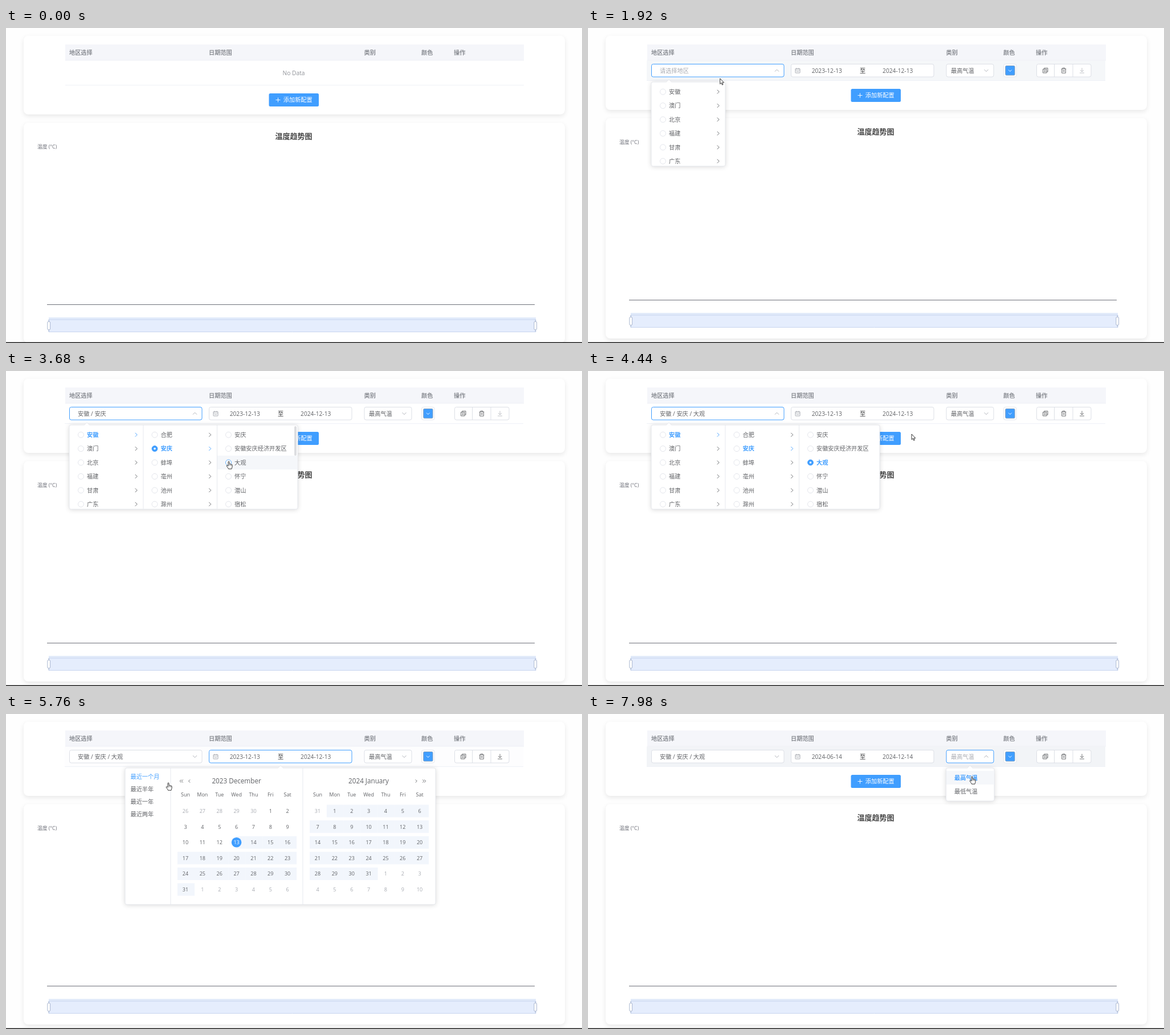
These frames come from a looping animation (1011 px wide and 554 px high, 8000 ms). An HTML page with a canvas:

```html
<!DOCTYPE html>
<html lang="zh">
<head>
<meta charset="utf-8">
<title>温度趋势图</title>
<style>
html, body { margin: 0; width: 100%; height: 100%; overflow: hidden; background: #fefefe; }
canvas { display: block; width: 1011px; height: 554px; }
</style>
</head>
<body>
<canvas id="stage"></canvas>
<script>
const W = 1011, H = 554, LOOP = 8000;
const canvas = document.getElementById('stage');
const ctx = canvas.getContext('2d');
const dpr = window.devicePixelRatio || 1;
canvas.width = W * dpr;
canvas.height = H * dpr;

const FONT = '"Open Sans", "Noto Sans CJK SC", "Noto Sans CJK", sans-serif';
const BLUE = '#409eff', INK = '#606266', MUTED = '#a8abb2', BORDER = '#dcdfe6', LINE = '#ebeef5';

// Moments at which the interface changes, in ms
const AT = { add: 760, region: 1620, province: 2500, city: 3040, county: 3880, regionEnd: 4660,
  dates: 5100, datesEnd: 6490, type: 7500 };

const PATH = [
  [160, 612, 29], [560, 512, 133], [800, 512, 133], [1240, 253, 83], [1700, 253, 83],
  [2400, 163, 108], [2520, 163, 108], [2920, 262, 134], [3320, 262, 134], [3680, 391, 159],
  [3900, 391, 159], [4420, 568, 111], [4650, 568, 111], [5080, 418, 82], [5520, 418, 82],
  [5840, 261, 128], [6720, 261, 128], [7300, 670, 78], [7540, 670, 78], [7920, 674, 110]
];
const HOVERS = [[1100, 1850], [4950, 5560], [7160, 9000]];
const COLUMNS = [
  { x: 111, items: ['安徽', '澳门', '北京', '福建', '甘肃', '广东'] },
  { x: 240.5, items: ['合肥', '安庆', '蚌埠', '亳州', '池州', '滁州'] },
  { x: 370, items: ['安庆', '安徽安庆经济开发区', '大观', '怀宁', '潜山', '宿松'] }
];
const EDGES = [241, 371, 512];

const clamp = v => Math.max(0, Math.min(1, v));
const smooth = v => v * v * (3 - 2 * v);
const easeOut = v => 1 - Math.pow(1 - clamp(v), 5);
const between = (t, a, b) => t >= a && t < b;
const inside = (p, x0, y0, x1, y1) => p && p.x >= x0 && p.x <= x1 && p.y >= y0 && p.y <= y1;
const popped = (t, open, close = 1e9) => t < close ? easeOut((t - open) / 300) : 1 - easeOut((t - close) / 300);

function pointer(t) {
  if (t < PATH[0][0]) return null;
  let i = 0;
  while (i < PATH.length - 1 && PATH[i + 1][0] <= t) i++;
  const a = PATH[i], b = PATH[i + 1] || a;
  const k = a === b ? 0 : smooth((t - a[0]) / (b[0] - a[0]));
  return { x: a[1] + (b[1] - a[1]) * k, y: a[2] + (b[2] - a[2]) * k };
}

function rowTint(t) {
  return Math.max(...HOVERS.map(([a, b]) => Math.min(clamp((t - a) / 250), 1 - clamp((t - b) / 250))));
}

function text(s, x, y, { size = 10.2, color = INK, bold = false, align = 'left' } = {}) {
  ctx.font = `${bold ? 'bold ' : ''}${size}px ${FONT}`;
  ctx.fillStyle = color;
  ctx.textAlign = align;
  ctx.fillText(s, x, y + size * 0.37);
}

function rect(x0, y0, x1, y1, fill) {
  ctx.fillStyle = fill;
  ctx.fillRect(x0, y0, x1 - x0, y1 - y0);
}

function box(x0, y0, x1, y1, r, fill, stroke) {
  ctx.beginPath();
  ctx.roundRect(x0, y0, x1 - x0, y1 - y0, r);
  if (fill) { ctx.fillStyle = fill; ctx.fill(); }
  if (stroke) { ctx.strokeStyle = stroke; ctx.lineWidth = 1; ctx.stroke(); }
}

function lines(color, width, ...paths) {
  ctx.strokeStyle = color;
  ctx.lineWidth = width;
  ctx.beginPath();
  for (const p of paths) {
    ctx.moveTo(p[0], p[1]);
    for (let i = 2; i < p.length; i += 2) ctx.lineTo(p[i], p[i + 1]);
  }
  ctx.stroke();
}

function circle(x, y, r, fill, stroke) {
  ctx.beginPath();
  ctx.arc(x, y, r, 0, Math.PI * 2);
  if (fill) { ctx.fillStyle = fill; ctx.fill(); }
  if (stroke) { ctx.strokeStyle = stroke; ctx.lineWidth = 0.8; ctx.stroke(); }
}

function shadowed(color, blur, dy, draw) {
  ctx.save();
  ctx.shadowColor = color;
  ctx.shadowBlur = blur * dpr;
  ctx.shadowOffsetY = dy * dpr;
  draw();
  ctx.restore();
}

const card = (y0, y1) =>
  shadowed('rgba(0,0,0,.09)', 8, 3, () => box(31, y0, 981, y1, 8, '#fff'));

// Vertical chevron; dir 1 points down, -1 up
const chevron = (x, y, dir, color = MUTED, w = 3.5) =>
  lines(color, 0.9, [x - w, y - dir * w / 2, x, y + dir * w / 2, x + w, y - dir * w / 2]);

// Horizontal angle; dir 1 points right, -1 left
const angle = (x, y, dir, color = INK, h = 3.4) =>
  lines(color, 0.9, [x - dir * h / 2, y - h, x + dir * h / 2, y, x - dir * h / 2, y + h]);

const caret = (x, y) => rect(x, y - 6.5, x + 0.9, y + 6.5, '#303133');

function popup(k, x0, x1, height, arrowX, draw) {
  if (k <= 0.004) return;
  ctx.save();
  ctx.globalAlpha = k;
  ctx.translate(0, 95);
  ctx.scale(1, k);
  shadowed('rgba(0,0,0,.16)', 8, 1, () => box(x0, 0, x1, height, 3, '#fff'));
  box(x0, 0, x1, height, 3, '#fff', '#e6e8ed');
  ctx.beginPath();
  ctx.moveTo(arrowX - 5, 0.8);
  ctx.lineTo(arrowX, -4);
  ctx.lineTo(arrowX + 5, 0.8);
  ctx.fillStyle = '#fff';
  ctx.fill();
  lines('#e6e8ed', 0.8, [arrowX - 5, 0, arrowX, -4, arrowX + 5, 0]);
  draw();
  ctx.restore();
}

function addButton(y, p) {
  const hot = inside(p, 461, y - 11.5, 549, y + 11.5);
  box(461.5, y - 11.5, 549, y + 11.5, 2.5, hot ? '#79bbff' : BLUE);
  lines('#fff', 0.9, [473.5, y, 481.5, y], [477.5, y - 4, 477.5, y + 4]);
  text('添加新配置', 486.8, y, { color: '#fff' });
}

function header() {
  rect(104, 29, 909, 57, '#f5f6fa');
  rect(104, 56.5, 909, 57.3, LINE);
  [['地区选择', 111], ['日期范围', 356], ['类别', 628.5], ['颜色', 729], ['操作', 786]]
    .forEach(([s, x]) => text(s, x, 43, { bold: true, color: '#8b8e94' }));
}

function calendarIcon(x, y) {
  box(x - 4, y - 3.5, x + 4, y + 4, 0.5, null, MUTED);
  lines(MUTED, 0.8, [x - 4, y - 1, x + 4, y - 1], [x - 2, y - 5, x - 2, y - 2.5], [x + 2, y - 5, x + 2, y - 2.5],
    [x - 2.3, y + 1.5, x + 2.3, y + 1.5]);
}

function actions(ready) {
  box(787.5, 63.5, 883, 86, 3, '#fff', BORDER);
  lines(BORDER, 1, [818.5, 64, 818.5, 86], [851, 64, 851, 86]);
  ctx.lineCap = 'butt';
  lines(INK, 0.9, [800.5, 72.5, 800.5, 70.5, 807, 70.5, 807, 77, 805, 77], [798.5, 72.5, 805, 72.5, 805, 79, 798.5, 79, 798.5, 72.5],
    [800, 74.8, 803.5, 74.8], [800, 76.8, 803.5, 76.8]);
  lines(INK, 0.9, [830.7, 72, 839.3, 72], [833, 72, 833, 70.3, 837, 70.3, 837, 72],
    [831.7, 72, 831.7, 79.2, 838.3, 79.2, 838.3, 72], [834, 74, 834, 77], [836, 74, 836, 77]);
  lines(ready ? INK : '#b8bbc1', 0.9, [867, 70.3, 867, 76.8], [864, 74, 867, 77, 870, 74], [863, 79, 871, 79]);
}

function row(t, p) {
  rect(103, 57.3, 908, 92, `rgba(242,244,247,${rowTint(t)})`);
  rect(103, 92, 908, 92.8, LINE);

  const picking = between(t, AT.region, AT.regionEnd);
  box(111.5, 63.5, 344, 86, 3, '#fff', picking ? BLUE : BORDER);
  const region = t < AT.city ? '请选择地区' : t < AT.county ? '安徽 / 安庆' : '安徽 / 安庆 / 大观';
  text(region, 126, 75, { color: t < AT.city ? MUTED : INK });
  chevron(331.5, 74.8, picking ? -1 : 1);

  const dating = between(t, AT.dates, 7440);
  const recent = t >= AT.datesEnd;
  box(356.5, 63.5, 607, 86, 3, '#fff', dating ? BLUE : BORDER);
  calendarIcon(368, 75);
  text(recent ? '2024-06-14' : '2023-12-13', 419.3, 75, { align: 'center' });
  text('至', 482, 75, { align: 'center', color: '#303133' });
  text(recent ? '2024-12-14' : '2024-12-13', 543.7, 75, { align: 'center' });
  if (between(t, AT.dates, 5710) || between(t, 6210, AT.datesEnd)) caret(419, 75);
  if (between(t, AT.datesEnd, 7000)) caret(445.5, 75);
  if (inside(p, 356, 63, 607, 86)) {
    circle(595.5, 74.8, 4.2, null, MUTED);
    lines(MUTED, 0.8, [594, 73.3, 597, 76.3], [597, 73.3, 594, 76.3]);
  }

  const typing = t >= AT.type;
  box(629, 63.5, 712, 86, 3, '#fff', typing ? BLUE : BORDER);
  text('最高气温', 637, 75, { color: typing ? MUTED : INK });
  chevron(699, 74.8, typing ? -1 : 1);

  box(729.5, 63.5, 752, 86, 3, '#fff', '#e4e7ed');
  box(732.8, 66.5, 749, 83, 1.5, BLUE, '#7f9fc0');
  chevron(740.8, 75, 1, '#fff', 2.8);
  actions(t >= AT.county);
}

function chart(dy) {
  text('温度趋势图', 505, 182 + dy, { size: 13, bold: true, color: '#464646', align: 'center' });
  text('温度 (°C)', 55, 200.3 + dy, { size: 8.75, color: '#6e7079' });
  rect(72, 478 + dy, 928, 479 + dy, '#6e7079');
  rect(75, 501 + dy, 930, 505 + dy, '#e1eafa');
  rect(75, 505 + dy, 930, 526.5 + dy, '#e5edfd');
  lines('#c3d2ee', 0.9, [75, 505 + dy, 930, 505 + dy, 930, 526.5 + dy, 75, 526.5 + dy, 75, 505 + dy]);
  for (const x of [75.2, 929.2]) {
    lines('#acb8d1', 1, [x, 505 + dy, x, 526 + dy]);
    box(x - 2.4, 508.5 + dy, x + 2.4, 522.5 + dy, 1.5, '#fff', '#acb8d1');
  }
}

function regionPopup(t, p) {
  const count = t < AT.province ? 1 : t < AT.city ? 2 : 3;
  const picked = t < AT.city ? null : t < AT.county ? [1, 1] : [2, 2];
  popup(popped(t, AT.region, AT.regionEnd), 111, EDGES[count - 1], 148, 142, () => {
    ctx.beginPath();
    ctx.rect(111, 0, EDGES[count - 1] - 111, 147.5);
    ctx.clip();
    COLUMNS.slice(0, count).forEach((col, c) => {
      const over = t > AT.region && inside(p, col.x, 98, EDGES[c], 243);
      if (c) rect(col.x, 0, col.x + 0.9, 148, '#e4e7ed');
      col.items.forEach((name, i) => {
        const y = 17.2 + i * 24.4;
        const hot = over && Math.abs(p.y - 95 - y) < 12.2;
        if (hot) rect(col.x + 1, y - 12.2, EDGES[c] - 1, y + 12.2, '#f5f7fa');
        const checked = picked && picked[0] === c && picked[1] === i;
        const active = checked || (c === 0 && i === 0 && count > 1) || (c === 1 && i === 1 && count > 2);
        const color = active && picked ? BLUE : INK;
        const rx = col.x + 20.5;
        circle(rx, y, 5, checked ? BLUE : '#fff', checked || (hot && Math.abs(p.x - rx) < 6) ? BLUE : BORDER);
        if (checked) circle(rx, y, 1.8, '#fff');
        text(name, col.x + 31, y, { color, bold: active });
        if (c < 2) angle(col.x + 117.5, y, 1, color);
      });
      if (over) box(EDGES[c] - 6, 2, EDGES[c] - 2, 54, 2, '#dddee1');
    });
    if (between(t, AT.province, AT.city + 240)) caret(162.7, 17.2);
  });
}

const DAYS = ['Sun', 'Mon', 'Tue', 'Wed', 'Thu', 'Fri', 'Sat'];
const STEP = 29.85;

// lead: cells before the 1st; from: first selected day
function month(x, title, lead, prevLength, from) {
  text(title, x + 3 * STEP, 23, { size: 11.7, align: 'center' });
  DAYS.forEach((d, i) => text(d, x + i * STEP, 47, { size: 9, align: 'center' }));
  for (let i = 0; i < 42; i++) {
    const cx = x + (i % 7) * STEP, cy = 75.6 + Math.floor(i / 7) * 27.6;
    const day = i - lead + 1;
    const current = day >= 1 && day <= 31;
    if (current && day >= from) {
      const start = from > 1 && day === from;
      rect(start ? cx : cx - 14, cy - 11, cx + 16, cy + 11, '#f2f6fc');
    }
  }
  for (let i = 0; i < 42; i++) {
    const cx = x + (i % 7) * STEP, cy = 75.6 + Math.floor(i / 7) * 27.6;
    const day = i - lead + 1;
    const current = day >= 1 && day <= 31;
    const start = from > 1 && day === from;
    if (start) circle(cx, cy, 8.8, BLUE);
    const label = day < 1 ? prevLength + day : day > 31 ? day - 31 : day;
    text(String(label), cx, cy, { size: 9, align: 'center', color: start ? '#fff' : current ? INK : MUTED });
  }
}

function datePopup(t, p) {
  popup(popped(t, AT.dates, AT.datesEnd), 209, 754, 240, 482, () => {
    rect(288.5, 0, 289.4, 240, '#e4e7ed');
    rect(520.5, 0, 521.4, 240, '#e4e7ed');
    ['最近一个月', '最近半年', '最近一年', '最近两年'].forEach((s, i) => {
      const y = 15.5 + i * 21.9;
      const hot = inside(p, 209, 95 + y - 10.9, 288, 95 + y + 10.9);
      text(s, 218.5, y, { color: hot ? BLUE : INK });
    });
    month(315, '2023 December', 5, 30, 13);
    month(547, '2024 January', 1, 31, 1);
    [306.5, 309.5, 321.8].forEach(x => angle(x, 23, -1, INK, 2.6));
    [720, 732.5, 735.5].forEach(x => angle(x, 23, 1, INK, 2.6));
  });
}

function typePopup(t, p) {
  popup(popped(t, AT.type), 628.5, 713, 58, 670.5, () => {
    const low = inside(p, 628, 220, 713, 244);
    rect(629, low ? 29.5 : 5, 712.5, low ? 53.5 : 29, '#f5f7fa');
    text('最高气温', 643, 17.2, { color: BLUE, bold: true });
    text('最低气温', 643, 41.5);
  });
}

function shapeAt(t, p) {
  const shift = t < AT.add ? 8 : 0;
  const right = t < AT.province ? 241 : t < AT.city ? 371 : 512;
  if (between(t, AT.region, AT.regionEnd) && inside(p, 111, 97, right, 243)) return 'hand';
  if (between(t, AT.dates, AT.datesEnd) && inside(p, 209, 97, 288, 190)) return 'hand';
  if (t >= AT.type && inside(p, 628, 97, 713, 153)) return 'hand';
  if (inside(p, 461, 107 + shift, 549, 130 + shift)) return 'hand';
  if (t < AT.add) return 'arrow';
  if (inside(p, 356, 63, 607, 86)) return 'beam';
  if (inside(p, 111, 63, 344, 86) || inside(p, 629, 63, 712, 86)) return 'hand';
  return 'arrow';
}

const ARROW = new Path2D('M0 0V9.6L2.2 7.6L3.8 11.2L5.3 10.5L3.8 7.1H6.8Z');
const HAND = new Path2D('M-1 .9C-1 -.3 1 -.3 1 .9V4.6C1.3 3.9 2.7 4 2.8 5C3.3 4.4 4.5 4.6 4.6 5.5' +
  'C5.2 5 6.1 5.4 6.1 6.3V9.2C6.1 11 5 11.6 5 13.2H-.5C-.7 11.8 -3.6 9 -3.8 7.6C-3.8 6.5 -2.4 6.5 -1 8.2Z');

function drawPointer(t, p) {
  if (!p) return;
  const shape = shapeAt(t, p);
  ctx.save();
  ctx.translate(p.x, p.y);
  if (shape === 'beam') {
    lines('#222', 0.9, [-2.5, -5, 2.5, -5], [0, -5, 0, 5], [-2.5, 5, 2.5, 5]);
  } else {
    const path = shape === 'hand' ? HAND : ARROW;
    ctx.fillStyle = '#fff';
    ctx.strokeStyle = '#222';
    ctx.lineWidth = 0.9;
    ctx.lineJoin = 'round';
    ctx.fill(path);
    ctx.stroke(path);
    if (shape === 'hand') lines('#222', 0.6, [1, 5, 1, 7.5], [2.8, 5.3, 2.8, 7.5], [4.6, 5.8, 4.6, 7.7]);
  }
  ctx.restore();
}

function render(t) {
  const p = pointer(t);
  const added = t >= AT.add;
  const dy = added ? 0 : 8;
  ctx.setTransform(dpr, 0, 0, dpr, 0, 0);
  rect(0, 0, W, H, '#fefefe');
  card(13.5, 144 + dy);
  card(158.5 + dy, 546 + dy);
  header();
  if (added) {
    row(t, p);
  } else {
    text('No Data', 505, 79, { color: '#909399', align: 'center' });
    rect(104, 100, 909, 100.8, LINE);
  }
  addButton(118.5 + dy, p);
  chart(dy);
  regionPopup(t, p);
  datePopup(t, p);
  typePopup(t, p);
  rect(0, 552.6, W, H, '#111');
  drawPointer(t, p);
}

const begin = performance.now();
function tick() {
  render((performance.now() - begin) % LOOP);
  requestAnimationFrame(tick);
}
tick();
</script>
</body>
</html>
```
